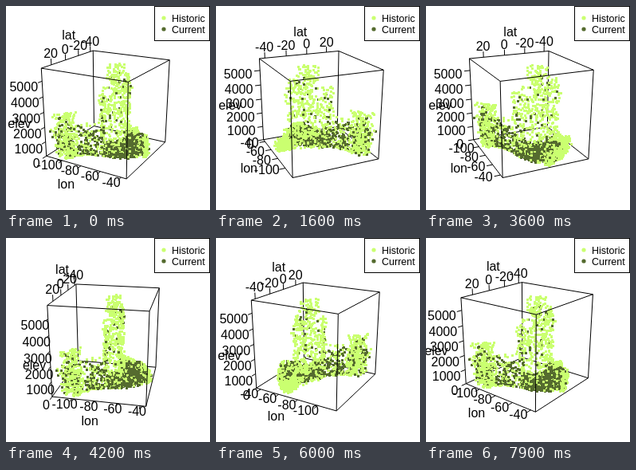
Write an HTML page with a canvas that moves like this. It is 256 px wide and 256 px high and loops after 8 s.

```html
<!DOCTYPE html>
<html lang="en">
<head>
<meta charset="utf-8">
<title>Rotating range plot</title>
<style>
html, body { margin: 0; width: 100%; height: 100%; overflow: hidden; background: #fff; }
canvas { display: block; width: 256px; height: 256px; }
</style>
</head>
<body>
<canvas id="stage" width="256" height="256"></canvas>
<script>
const ctx = document.getElementById('stage').getContext('2d');
const HISTORIC = '#caff70', CURRENT = '#556b2f';
const STEP_MS = 100, STEPS = 40;
const FONT = '"Liberation Sans", Arial, sans-serif';
const TICK = 0.133, LABEL = 0.267, TITLE = 0.533;

// Camera: looks down on a cube of half-size 1
const FOCAL = 504.6, DIST = 8.92, TILT = 20 * Math.PI / 180;
const ct = Math.cos(TILT), st = Math.sin(TILT);

const scale = (min, max) => v => 2 * (v - min) / (max - min) - 1;
const lonAt = scale(-118, -35), latAt = scale(-45, 33), elevAt = scale(0, 5800);

// Strips of land: lon, lat -> lon, lat, half-width, peak, bias, historic, current
const STRIPS = [
  [-110, 29, -97, 17, 3.2, 2900, 1.1, 240, 70],
  [-99, 29, -95, 18, 2.5, 1700, 1.6, 110, 30],
  [-91, 18, -78, 8, 2, 2300, 1.7, 70, 90],
  [-75, 9, -79, -5, 1.8, 4300, 1, 90, 28],
  [-78, -6, -67, -21, 2, 5700, 0.8, 250, 22],
  [-67, -21, -68, -32, 2, 4900, 1, 110, 6],
  [-72, 8, -62, 6, 2.5, 1300, 1.8, 40, 60],
  [-72, 3, -62, -13, 5, 750, 1.6, 60, 190],
  [-66, 2, -49, -4, 5, 700, 1.5, 60, 200],
  [-57, -11, -45, -10, 6, 1100, 1.2, 50, 190],
  [-61, -20, -49, -20, 5, 1200, 1.2, 60, 130],
  [-37, -7, -49, -27, 2, 900, 1.5, 190, 12],
  [-66, -26, -65, -41, 3.5, 900, 1.6, 150, 0],
  [-60, -26, -55, -33, 3, 350, 1, 90, 0]
];

let seed = 20517;
function rand() {
  seed = (seed + 0x6d2b79f5) | 0;
  let t = Math.imul(seed ^ seed >>> 15, 1 | seed);
  t = t + Math.imul(t ^ t >>> 7, 61 | t) ^ t;
  return ((t ^ t >>> 14) >>> 0) / 4294967296;
}

const points = [];
for (const [lonA, latA, lonB, latB, wide, peak, bias, past, now] of STRIPS) {
  for (let i = 0; i < past + now; i++) {
    const t = rand(), side = () => (rand() + rand() - 1) * wide * 1.4;
    const lon = lonA + (lonB - lonA) * t + side();
    const lat = latA + (latB - latA) * t + side();
    const top = i < past ? peak : peak * 0.9;
    points.push({
      u: Math.min(1, lonAt(lon)), v: Math.min(1, latAt(lat)),
      z: elevAt(top * Math.pow(rand(), bias)),
      color: i < past ? HISTORIC : CURRENT
    });
  }
}

let sinB, cosB;
const depthOf = (u, v) => u * cosB + v * sinB;

function project(u, v, z) {
  const x = u * sinB - v * cosB, f = depthOf(u, v);
  const d = DIST - z * st - f * ct;
  return { x: 128 + FOCAL * x / d, y: 128 - FOCAL * (z * ct - f * st) / d, d };
}

function line(a, b) {
  const p = project(...a), q = project(...b);
  ctx.beginPath();
  ctx.moveTo(p.x, p.y);
  ctx.lineTo(q.x, q.y);
  ctx.stroke();
}

// Text moves away from its anchor by a share of its own width
function label(text, p, from, lean, dy) {
  const dx = p.x - from.x, len = Math.hypot(dx, p.y - from.y) || 1;
  const half = ctx.measureText(text).width / 2;
  ctx.fillText(text, p.x + lean * half * dx / len, p.y + dy + 5.7);
}

function axis(name, values, place, out, lean, dy, titleDy) {
  const away = (p, k) => p.map((c, i) => c + out[i] * k);
  for (const v of values) {
    const p = place(v);
    line(p, away(p, TICK));
    label(String(v), project(...away(p, LABEL)), project(...p), lean, dy);
  }
  const mid = place(null);
  label(name, project(...away(mid, TITLE)), project(...mid), lean, titleDy);
}

function drawBox(back) {
  const [bu, bv] = back;
  const edges = [[], []];
  const add = (a, b) => {
    const far = [a, b].some(c => c[0] === bu && c[1] === bv);
    edges[far ? 0 : 1].push([a, b]);
  };
  for (const i of [-1, 1]) for (const j of [-1, 1]) {
    add([i, j, -1], [i, j, 1]);
    add([-1, i, j], [1, i, j]);
    add([i, -1, j], [i, 1, j]);
  }
  return edges;
}

function drawPoints() {
  const seen = points.map(p => ({ ...project(p.u, p.v, p.z), color: p.color }));
  seen.sort((a, b) => b.d - a.d);
  for (const p of seen) {
    ctx.fillStyle = p.color;
    ctx.fillRect(Math.round(p.x - 1.5), Math.round(p.y - 1.5), 3, 3);
  }
}

function drawAxes(lonSide, latSide) {
  ctx.fillStyle = '#000';
  ctx.font = '16px ' + FONT;
  ctx.textAlign = 'center';
  const at = (f, v) => v === null ? 0 : f(v);
  axis('lat', [-40, -20, 0, 20], v => [lonSide, at(latAt, v), 1], [0, 0, 1], 0, 1, 0);
  axis('lon', [-100, -80, -60, -40], v => [at(lonAt, v), latSide, -1], [0, latSide, 0], 0.5, -1, 8);
  axis('elev', [0, 1000, 2000, 3000, 4000, 5000],
    v => [lonSide, latSide, at(elevAt, v)], [0, latSide, 0], 0.75, 3, 2);
}

function drawLegend() {
  ctx.fillStyle = '#fff';
  ctx.fillRect(186, 0, 70, 44);
  ctx.strokeRect(186.5, 0.5, 69, 43);
  ctx.font = '12.5px ' + FONT;
  ctx.textAlign = 'left';
  [['Historic', HISTORIC, 15], ['Current', CURRENT, 29]].forEach(([text, color, y]) => {
    ctx.fillStyle = color;
    ctx.beginPath();
    ctx.arc(198, y, 2.6, 0, 7);
    ctx.fill();
    ctx.fillStyle = '#000';
    ctx.fillText(text, 208, y + 5);
  });
}

function draw(step) {
  const turn = (60 + step * 360 / STEPS) * Math.PI / 180;
  sinB = Math.sin(turn);
  cosB = Math.cos(turn);
  const lonSide = cosB > 0 ? -1 : 1, latSide = sinB > 0 ? 1 : -1;

  ctx.fillStyle = '#fff';
  ctx.fillRect(0, 0, 256, 256);
  ctx.strokeStyle = '#000';
  ctx.lineWidth = 1;
  const [far, near] = drawBox([lonSide, -latSide]);
  far.forEach(e => line(...e));
  drawPoints();
  near.forEach(e => line(...e));
  drawAxes(lonSide, latSide);
  drawLegend();
}

const start = performance.now();
let shown = -1;
function tick() {
  const step = Math.floor((performance.now() - start) / STEP_MS) % STEPS;
  if (step !== shown) draw(shown = step);
  requestAnimationFrame(tick);
}
tick();
</script>
</body>
</html>
```
